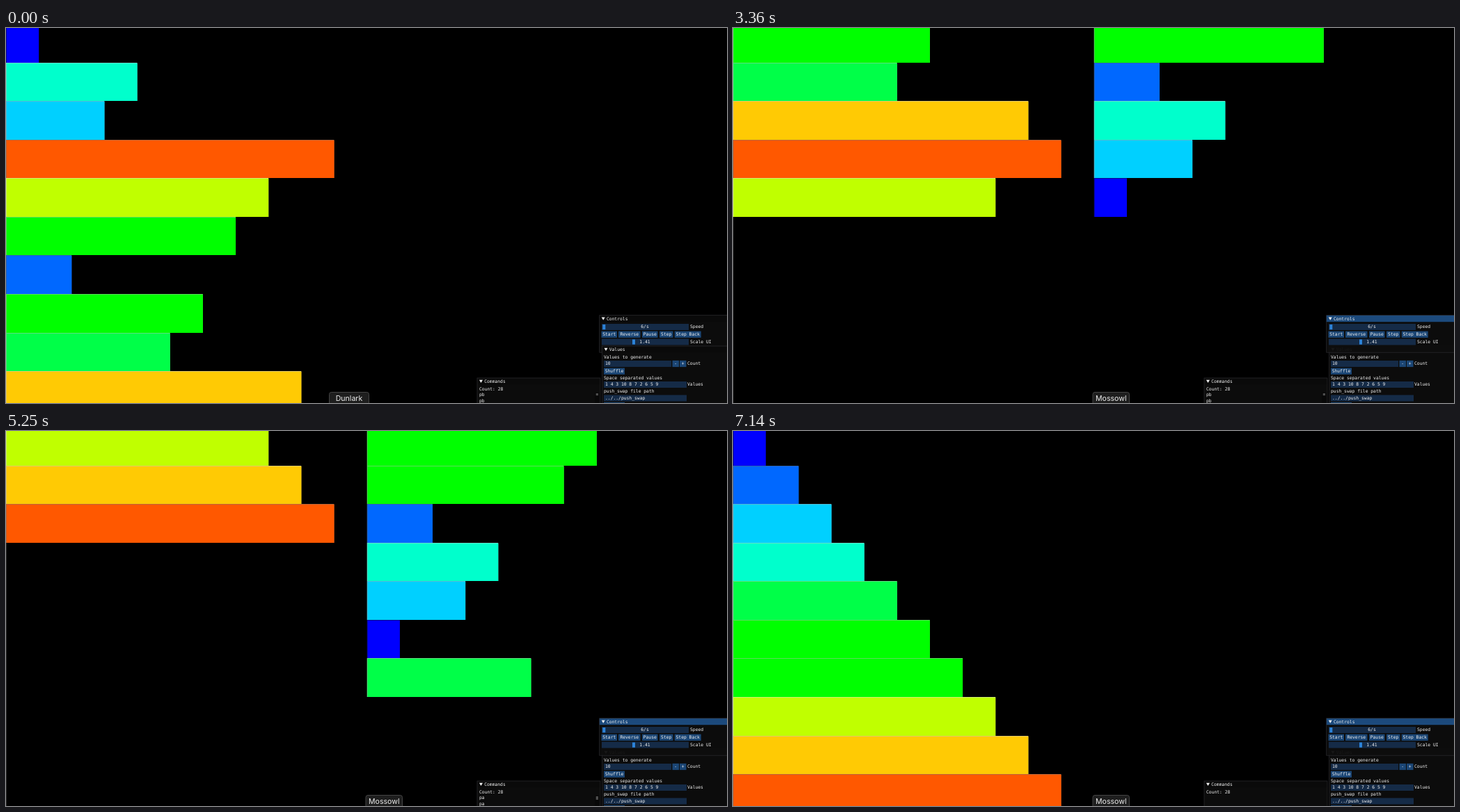
Write an HTML page with a canvas that moves like this. It is 1036 by 540 pixels and loops after 7980 ms.

```html
<!DOCTYPE html>
<html lang="en">
<head>
<meta charset="utf-8">
<title>push_swap visualizer</title>
<style>
  html, body { margin: 0; width: 100%; height: 100%; overflow: hidden; background: #000; }
  canvas { display: block; }
</style>
</head>
<body>
<canvas id="stage" width="1036" height="540"></canvas>
<script>
const ctx = document.getElementById('stage').getContext('2d');

const LOOP = 7980;
const FIRST_COMMAND = 2023, COMMAND_GAP = 187;
const FOCUS_TIME = 1960;
const LABELS = [
  { text: 'Dunlark', x: 464, w: 58, from: 0, to: 140 },
  { text: 'Mossowl', x: 516.5, w: 53.5, from: 2650, to: LOOP },
];

const START = [1, 4, 3, 10, 8, 7, 2, 6, 5, 9];
const COMMANDS = ('pb pb pb ra ra ss pb pb pb pb pb sa pb sb pa pa rb sb ' +
  'pa pa rrb pa sb pa sb pa pa pa').split(' ');
const BAR_COLORS = [[0, 0, 255], [0, 104, 255], [0, 208, 255], [0, 255, 204], [0, 255, 72],
  [0, 255, 0], [0, 255, 0], [192, 255, 0], [255, 202, 4], [255, 88, 0]];
const BAR_UNIT = 47.15, ROW = 55.57, TOP = -6;

const COLOR = {
  window: 'rgba(13,13,13,0.95)', border: '#2b2b30', title: '#0a0a0a', focused: '#1c4a7c',
  field: '#152b47', button: '#1b4675', grab: '#2c83d8', text: '#f2f2f2',
};

const swap = s => { if (s.length > 1) [s[0], s[1]] = [s[1], s[0]]; };
const rotate = s => s.push(s.shift());
const reverse = s => s.unshift(s.pop());
const OPS = {
  pa: (a, b) => a.unshift(b.shift()),
  pb: (a, b) => b.unshift(a.shift()),
  sa: a => swap(a),
  sb: (a, b) => swap(b),
  ss: (a, b) => { swap(a); swap(b); },
  ra: a => rotate(a),
  rb: (a, b) => rotate(b),
  rrb: (a, b) => reverse(b),
};

// Stack contents after each number of commands.
const states = [[START, []]];
for (const name of COMMANDS) {
  const [a, b] = states.at(-1).map(s => [...s]);
  OPS[name](a, b);
  states.push([a, b]);
}

const rgb = channels => `rgb(${channels.map(Math.round).join()})`;

// Half-desaturated shade used on the upper and left edge of a bar.
function edgeColor(color) {
  const [r, g, b] = color;
  const luma = 0.21 * r + 0.72 * g + 0.07 * b;
  return rgb(color.map(c => (c + luma) / 2));
}

function rect(x, y, w, h, color) {
  ctx.fillStyle = color;
  ctx.fillRect(x, y, w, h);
}

function text(str, x, y, align = 'left') {
  ctx.font = '6.35px "DejaVu Sans Mono", monospace';
  ctx.textAlign = align;
  ctx.textBaseline = 'middle';
  ctx.fillStyle = COLOR.text;
  ctx.fillText(str, x, y);
}

function panel(title, x, y, w, h, focused) {
  rect(x, y, w, h, COLOR.window);
  rect(x, y, w, 9.5, focused ? COLOR.focused : COLOR.title);
  ctx.strokeStyle = COLOR.border;
  ctx.lineWidth = 0.7;
  ctx.strokeRect(x, y, w, h);
  ctx.fillStyle = COLOR.text;
  ctx.beginPath();
  ctx.moveTo(x + 3, y + 2.8);
  ctx.lineTo(x + 8, y + 2.8);
  ctx.lineTo(x + 5.5, y + 7);
  ctx.fill();
  text(title, x + 10.2, y + 5.2);
}

function button(label, x, y, w) {
  rect(x, y, w, 9.3, COLOR.button);
  text(label, x + w / 2, y + 4.8, 'center');
}

function field(value, label, x, y, w, labelX) {
  rect(x, y, w, 9, COLOR.field);
  text(value, x + 2, y + 4.7);
  if (label) text(label, labelX, y + 4.7);
}

function slider(value, label, y, grabX) {
  rect(856, y, 125, 9, COLOR.field);
  rect(grabX, y + 1, 4, 7.2, COLOR.grab);
  text(value, 918, y + 4.7, 'center');
  text(label, 983, y + 4.7);
}

function drawStack(stack, x) {
  stack.forEach((v, i) => {
    const y = Math.round(TOP + i * ROW);
    const w = v * BAR_UNIT, h = Math.round(TOP + (i + 1) * ROW) - y;
    const color = BAR_COLORS[v - 1];
    rect(x, y, w, h, edgeColor(color));
    rect(x + 1, y + 1, w - 1, h - 1, rgb(color));
  });
}

function drawCommands(done) {
  const left = COMMANDS.slice(done);
  panel('Commands', 677, 504, 177, 50, false);
  text('Count: 28', 680, 520.3);
  left.slice(0, 2).forEach((name, i) => text(name, 680, 528.8 + i * 8.7));
  if (left.length > 2) {
    rect(846, 525, 6.5, 15, '#080808');
    rect(847.7, 526, 3.2, Math.max(3.2, 50 / left.length), '#4f4f4f');
  }
}

function drawControls(focused) {
  panel('Controls', 852.7, 413.7, 190, 53.5, focused);
  slider('6/s', 'Speed', 426, 857.3);
  button('Start', 855.5, 436.6, 22.5);
  button('Reverse', 880, 436.6, 31.5);
  button('Pause', 914, 436.6, 22.5);
  button('Step', 939, 436.6, 19.5);
  button('Step Back', 960.7, 436.6, 38);
  slider('1.41', 'Scale UI', 447.5, 900);
}

function drawValues() {
  panel('Values', 856.5, 458, 190, 100, false);
  text('Values to generate', 859, 474.3);
  field('10', 'Count', 859, 479, 97, 979);
  button('-', 957.5, 478.8, 9.5);
  button('+', 968, 478.8, 9.5);
  button('Shuffle', 859, 489.6, 30);
  text('Space separated values', 859, 504);
  field(START.join(' '), 'Values', 859, 509, 119, 979);
  text('push_swap file path', 859, 523.6);
  field('../../push_swap', '', 859, 528.5, 119);
  rect(859, 539, 30, 1, COLOR.button);
}

function drawLabel({ text: name, x, w }) {
  ctx.beginPath();
  ctx.roundRect(x + 0.5, 524.5, w - 1, 24, 3);
  ctx.fillStyle = '#1e1e1e';
  ctx.fill();
  ctx.strokeStyle = '#444';
  ctx.lineWidth = 1;
  ctx.stroke();
  ctx.font = '10.6px Inter, sans-serif';
  ctx.textAlign = 'center';
  ctx.textBaseline = 'middle';
  ctx.fillStyle = '#eee';
  ctx.fillText(name, x + w / 2, 534.3);
}

function draw(t) {
  const done = Math.max(0, Math.min(COMMANDS.length,
    Math.floor((t - FIRST_COMMAND) / COMMAND_GAP) + 1));
  const focused = t >= FOCUS_TIME;
  const [a, b] = states[done];

  rect(0, 0, 1036, 540, '#000');
  rect(0, 0, 1, 540, '#2c2c2c');
  drawStack(a, 0);
  drawStack(b, 518.7);

  drawCommands(done);
  // The focused window is drawn on top.
  if (focused) {
    drawValues();
    drawControls(true);
  } else {
    drawControls(false);
    drawValues();
  }
  LABELS.filter(l => t >= l.from && t < l.to).forEach(drawLabel);
}

const began = performance.now();
function tick() {
  draw((performance.now() - began) % LOOP);
  requestAnimationFrame(tick);
}
tick();
</script>
</body>
</html>
```
